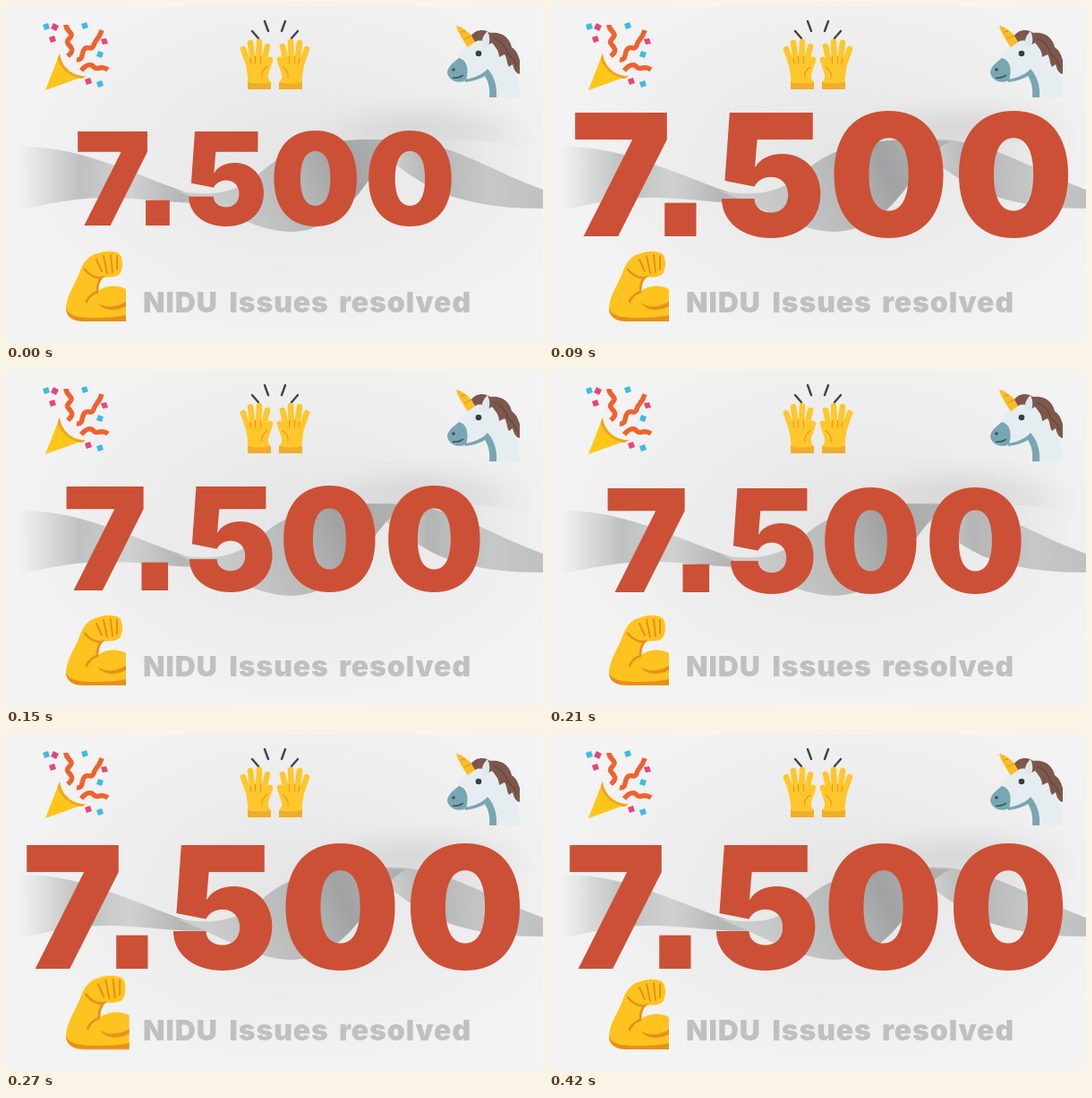
These frames come from a looping animation (600 px wide and 375 px high, 1.53 s). An HTML page:

```html
<!DOCTYPE html>
<html lang="en">
<head>
<meta charset="utf-8">
<title>7.500 issues resolved</title>
<style>
  html, body { margin: 0; width: 100%; height: 100%; overflow: hidden; background: #f2f2f2; }
  svg { display: block; width: 100vw; height: 100vh; }
  text { font-family: Inter, "Liberation Sans", sans-serif; font-optical-sizing: none; }
  #count { font-size: 190px; font-weight: 900; fill: #cc5036; text-anchor: middle; }
  #count .dot { font: bold 250px "Liberation Sans", sans-serif; }
  #label { font-size: 32px; font-weight: 900; fill: #bfc0c0; letter-spacing: .9px; }
  #number { transform-origin: 0 0; }
  #arm { transform-origin: 67px 352px; }
</style>
</head>
<body>
<svg viewBox="0 0 600 375">
  <defs>
    <radialGradient id="paper" gradientUnits="userSpaceOnUse" cx="330" cy="170" r="330" gradientTransform="translate(0 60) scale(1 .65)">
      <stop offset="0" stop-color="#e5e5e5"/>
      <stop offset=".5" stop-color="#ececec"/>
      <stop offset="1" stop-color="#f3f3f3"/>
    </radialGradient>
    <linearGradient id="leftFill" gradientUnits="userSpaceOnUse" x1="14" y1="0" x2="240" y2="0">
      <stop offset="0" stop-color="#c4c5c5" stop-opacity="0"/>
      <stop offset=".3" stop-color="#bfc0c0"/>
      <stop offset=".55" stop-color="#d0d1d1"/>
      <stop offset=".8" stop-color="#b4b6b6"/>
      <stop offset="1" stop-color="#bcbdbd"/>
    </linearGradient>
    <linearGradient id="midFill" gradientUnits="userSpaceOnUse" x1="240" y1="240" x2="420" y2="160">
      <stop offset="0" stop-color="#cbcccc"/>
      <stop offset=".45" stop-color="#b9bbbb"/>
      <stop offset=".75" stop-color="#a0a2a3"/>
      <stop offset="1" stop-color="#aeb0b0"/>
    </linearGradient>
    <linearGradient id="rightFill" gradientUnits="userSpaceOnUse" x1="405" y1="0" x2="600" y2="0">
      <stop offset="0" stop-color="#b4b6b6" stop-opacity=".2"/>
      <stop offset=".35" stop-color="#b4b6b6"/>
      <stop offset=".7" stop-color="#c6c7c7"/>
      <stop offset="1" stop-color="#bfc0c0"/>
    </linearGradient>
    <linearGradient id="sheetFill" x1="0" y1="0" x2="1" y2="0">
      <stop offset="0" stop-color="#d9d9d9"/>
      <stop offset=".6" stop-color="#eaeaea"/>
      <stop offset="1" stop-color="#f1f1f1"/>
    </linearGradient>
    <filter id="blur" x="-50%" y="-80%" width="200%" height="260%"><feGaussianBlur stdDeviation="16"/></filter>
    <clipPath id="unicornBox"><path d="M490 18H574V102H490Z"/></clipPath>
  </defs>

  <rect width="600" height="375" fill="url(#paper)"/>
  <path d="M350 151C420 115 510 115 580 152Z" fill="#c4c4c4" opacity=".75" filter="url(#blur)"/>
  <path d="M452 158C495 146 555 148 600 166V208C550 196 510 170 452 158Z" fill="url(#sheetFill)"/>
  <path d="M14 157C92 156 148 193 235 219C206 222 165 216 125 214C90 213 58 218 14 228Z" fill="url(#leftFill)"/>
  <path d="M398 151C480 138 530 180 600 205V226C555 226 525 222 488 209C460 197 438 178 398 151Z" fill="url(#rightFill)"/>
  <path d="M190 206C240 215 264 205 290 181C325 151 385 145 448 151C408 168 392 250 319 252C278 251 246 228 190 206Z" fill="url(#midFill)"/>

  <g id="popper">
    <path d="M44 94L60 53C61 66 73 79 89 78Z" fill="#ffc61a"/>
    <path d="M60 53C61 66 73 79 89 78L85 81C72 80 58 67 58 58Z" fill="#f2a41b"/>
    <g fill="none" stroke="#f0622f" stroke-width="5.5" stroke-linejoin="round">
      <path d="M69 56C75 51 75 48 70 43C65 38 74 36 73 32C72 28 67 27 67 21"/>
      <path d="M79 60C88 61 83 50 89 47C95 45 95 50 98 44C100 36 104 38 107 27"/>
      <path d="M84 72C90 65 95 64 98 68C102 73 105 65 114 71"/>
    </g>
    <g fill="#e8447c">
      <path d="M53 19l6 3-3 6-6-3zM48 35l6-2 2 6-6 2zM106 37l6-1 2 6-6 1zM88 82l6-2 2 6-6 2z"/>
    </g>
    <g fill="#41b9e3">
      <path d="M41 21l6-2 2 6-6 2zM84 20l6-2 2 6-6 2zM103 50l6 2-2 6-6-2zM101 85l6-2 2 6-6 2z"/>
    </g>
  </g>

  <g id="hands">
    <path d="M275 28l7 8M289 17l4 11M326 28l-7 8M312 17l-4 11" fill="none" stroke="#3f4447" stroke-width="2.4" stroke-linecap="round"/>
    <g id="hand">
      <path d="M268 60H290L293 70C292 78 293 83 296 85V93H270V85C271 78 268 72 268 60Z" fill="#ffc72b"/>
      <path d="M271 65L265 48M276 63L273 41M282 63L283 40M287 66L292 45M289 78L295 60" fill="none" stroke="#ffc72b" stroke-width="6.6" stroke-linecap="round"/>
      <path d="M270 85Q283 88 296 85V93H270Z" fill="#f0ad2b"/>
      <path d="M273 58L274 64M278.500 56V64M284.500 56V64M292 68C287 71 285 75 286 80" fill="none" stroke="#e59a22" stroke-width="1.2" stroke-linecap="round"/>
    </g>
    <use href="#hand" transform="translate(601 0) scale(-1 1)"/>
  </g>

  <g id="unicorn" clip-path="url(#unicornBox)">
    <path d="M535 42L574 52V102H541Z" fill="#eef2f4"/>
    <path d="M521 39C532 33 550 39 558 53C569 68 574 82 574 102H541C543 91 541 82 536 77C528 81 519 80 512 84C503 88 494 82 493 74C494 66 502 62 506 57C510 49 512 43 521 39Z" fill="#e6edf0"/>
    <path d="M506 58C514 60 518 68 514 83C504 88 494 82 493 74C494 66 502 62 506 58Z" fill="#78a6b2"/>
    <path d="M513 82C524 80 533 76 538 70C546 79 549 90 548 102H540C541 92 539 84 535 78C529 82 520 84 513 85Z" fill="#78a6b2"/>
    <path d="M503 22C509 22 519 31 526 39L516 46C511 39 505 30 503 22Z" fill="#fbbd27"/>
    <path d="M508 29l5-1M512 37l8-4" stroke="#e39a20" stroke-width="1.3"/>
    <path d="M520 33C524 26 535 25 541 30C553 28 563 35 565 46C572 51 572 56 574 60V76C569 75 567 69 566 65L562 68C559 63 560 58 557 54L551 57C551 50 547 46 543 41L536 45C535 39 530 37 524 40Z" fill="#7d584c"/>
    <path d="M545 36C554 39 559 47 561 54C566 57 569 63 571 68" fill="none" stroke="#64443a" stroke-width="1.3"/>
    <path d="M531 45C531 37 534 32 538 28C541 34 541 41 538 47Z" fill="#dfe8eb"/>
    <circle cx="528" cy="53" r="3.300" fill="#343e43"/>
    <circle cx="500" cy="71" r="1.800" fill="#35545e"/>
    <path d="M499 80Q506 81 511 77" fill="none" stroke="#35545e" stroke-width="1.5"/>
  </g>

  <g id="number">
    <text id="count" x="55.5 122 223.5 354.5 494" y="0">7<tspan class="dot">.</tspan>500</text>
  </g>

  <g id="arm">
    <path d="M67 337C68 322 78 309 82 298C86 286 92 278 103 276C110 273 122 273 127 277C131 281 131 294 127 299C122 304 113 302 107 303C103 306 102 312 102 319C111 311 126 311 134 316V352H88C76 352 67 348 67 337Z" fill="#ffc31f"/>
    <path d="M67 337C69 346 82 348 100 348C114 348 126 347 134 345V352H88C76 352 67 348 67 337Z" fill="#e98f18"/>
    <path d="M88 294C94 301 101 304 107 303C103 307 102 312 102 319C96 321 92 325 90 330" fill="none" stroke="#e98f18" stroke-width="2.6" stroke-linecap="round"/>
    <path d="M102 331C112 338 124 336 134 330V335C123 341 110 341 102 331Z" fill="#e98f18"/>
    <path d="M101 283L107 296M109 279L113 298M117 278L119 297M124 279V294" fill="none" stroke="#e98f18" stroke-width="2" stroke-linecap="round"/>
  </g>

  <text id="label" y="342"><tspan x="153">NIDU</tspan> <tspan x="249.500">Issues</tspan> <tspan x="372">resolved</tspan></text>
</svg>
<script>
  const LOOP = 1530;

  // Each leg of 90 ms is shown as three hard steps.
  function play(id, poses) {
    const frames = poses.map(([time, x, y, scale]) => ({
      offset: time / LOOP,
      transform: `translate(${x}px, ${y}px) scale(${scale})`,
      easing: "steps(3, end)"
    }));
    document.getElementById(id)
      .animate(frames, { duration: LOOP, iterations: Infinity });
  }

  // time, left, baseline, scale
  play("number", [
    [0, 77, 245, .758],
    [90, 25, 257, 1],
    [180, 83.5, 241, .758],
    [270, 19, 262, 1],
    [LOOP, 19, 262, 1]
  ]);

  play("arm", [
    [0, 0, 0, 1],
    [240, 0, 0, 1],
    [330, 0, 0, 1.165],
    [420, 0, 0, 1],
    [LOOP, 0, 0, 1]
  ]);
</script>
</body>
</html>
```
